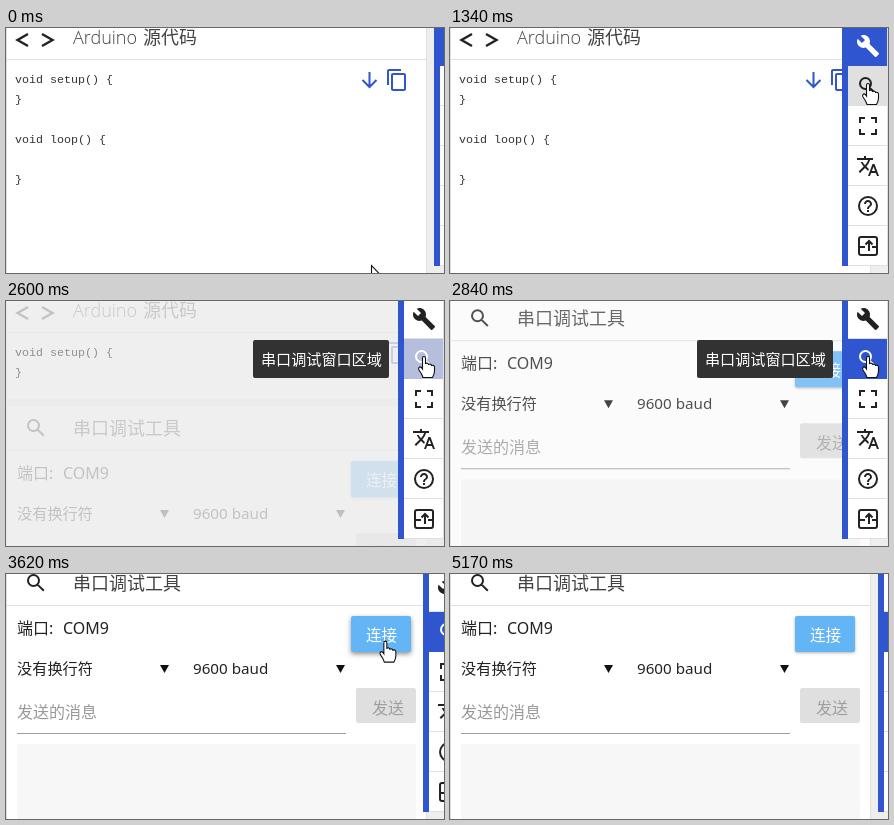
These frames come from a looping animation (438x245 px, 5.55 s). An HTML page with a canvas:

```html
<!DOCTYPE html>
<html lang="zh">
<head>
<meta charset="utf-8">
<title>Arduino 源代码</title>
<style>
html, body { margin: 0; width: 100%; height: 100%; overflow: hidden; background: #eee; }
canvas { display: block; width: 438px; height: 245px; }
</style>
</head>
<body>
<canvas id="stage" width="438" height="245"></canvas>
<script>
const ctx = document.getElementById('stage').getContext('2d');
const LOOP = 5550, START = 400, STEP = 78.2;
const BLUE = '#3056cf', INK = '#222', LINE = '#e0e0e0', PAGE = '#eee';
const SANS = '"Noto Sans", "Noto Sans CJK SC", "Noto Sans CJK", sans-serif';
const LIGHT = '"Open Sans", "Noto Sans CJK SC", "Noto Sans CJK", sans-serif';
const MONO = '"Liberation Mono", monospace';

// Icons on a 24 px grid
const WRENCH = new Path2D('M22.7 19l-9.1-9.1c.9-2.3.4-5-1.5-6.9-2-2-5-2.4-7.4-1.3L9 6 6 9 1.6 4.7C.4 7.1.9 10.1 2.9 12.1c1.9 1.9 4.6 2.4 6.9 1.5l9.1 9.1c.4.4 1 .4 1.4 0l2.3-2.3c.5-.4.5-1.1.1-1.4z');
const TRANSLATE = new Path2D('M12.87 15.07l-2.54-2.51.03-.03c1.74-1.94 2.98-4.17 3.71-6.53H17V4h-7V2H8v2H1v2h11.17C11.5 7.92 10.44 9.75 9 11.35 8.07 10.32 7.3 9.19 6.69 8h-2c.73 1.63 1.73 3.17 2.98 4.56l-5.09 5.02L4 19l5-5 3.11 3.11zM18.5 10h-2L12 22h2l1.12-3h4.75L21 22h2zm-2.62 7l1.62-4.33L19.12 17z');
const QUESTION = new Path2D('M12 6c-2.21 0-4 1.79-4 4h2c0-1.1.9-2 2-2s2 .9 2 2c0 2-3 1.75-3 5h2c0-2.25 3-2.5 3-5 0-2.21-1.79-4-4-4zM11 16h2v2h-2z');
const RING = new Path2D('M21 12a9 9 0 1 1-18 0a9 9 0 1 1 18 0z');
const COPY = new Path2D('M16 1H4c-1.1 0-2 .9-2 2v14h2V3h12zm3 4H8c-1.1 0-2 .9-2 2v14c0 1.1.9 2 2 2h11c1.1 0 2-.9 2-2V7c0-1.1-.9-2-2-2zm0 16H8V7h11z');
const SEARCH = new Path2D('M15 9.5a5.5 5.5 0 1 1-11 0a5.5 5.5 0 1 1 11 0zM13.6 13.6l6.2 6.2');
const CORNERS = new Path2D('M4 9V4h5M15 4h5v5M20 15v5h-5M9 20H4v-5');
const FOLD = new Path2D('M5 3h14q2 0 2 2v14q0 2-2 2H5q-2 0-2-2V5q0-2 2-2zM13 17V7M9.5 10.5L13 7l3.5 3.5M3 13h6M16 13h5');
const CODE = new Path2D('M22 6L11.5 12L22 18M36 6L46.5 12L36 18');
const DOWN = new Path2D('M8 1v15M1 9l7 7 7-7');
const ARROW = new Path2D('M.5.5v16l3.7-3.5 2.4 5.6 2.4-1-2.4-5.5h5z');
const HAND = new Path2D('M-1.5 12V2Q-1.5.5 0 .5T1.5 2V7.5Q4 6.500 4.500 8.500Q7 7.500 7.500 9.500Q10.500 8.500 10.500 11.500V15Q10.500 18 8.500 21.500H-1Q-2 18-5 14Q-6 12-4.500 11Q-3 10.500-1.500 13z');

// Key lists: [time, value, ...]
const POINTER = [[400, 365, 237], [556, 384, 192], [713, 424, 105], [791, 431, 83], [947, 430, 70],
  [1104, 424, 62], [1338, 418, 55], [3137, 418, 55], [3215, 412, 60], [3372, 393, 73],
  [3528, 384, 70], [3763, 370, 60], [3919, 366, 56], [4075, 400, 51], [4388, 394, 55],
  [4544, 394, 56], [4701, 398, 76], [4857, 405, 135], [5092, 418, 242]];
const SHIFT = [[713, 36], [791, 34], [869, 22], [947, 9], [1026, 3], [1104, 0],
  [3372, 0], [3450, 3], [3528, 13], [3606, 25], [3685, 33], [3763, 36]];
const TIP = [[1807, 0], [2198, 1], [3372, 1], [3606, 0]];
const VEIL = [[2434, 0], [2512, .5], [2590, .8], [2746, .4], [2903, .05], [3059, 0]];
const SCROLL = [[2590, 118], [2668, 72], [2746, 32], [2825, 8], [2903, 0]];
const PICK = [[2512, 0], [2590, .25], [2825, 1]];

function at(keys, t, i = 1) {
  if (t <= keys[0][0]) return keys[0][i];
  for (let n = 1; n < keys.length; n++) {
    const a = keys[n - 1], b = keys[n];
    if (t <= b[0]) return a[i] + (b[i] - a[i]) * (t - a[0]) / (b[0] - a[0]);
  }
  return keys[keys.length - 1][i];
}

function rect(x, y, w, h, color) {
  ctx.fillStyle = color;
  ctx.fillRect(x, y, w, h);
}

function box(x, y, w, h, color) {
  ctx.fillStyle = color;
  ctx.beginPath();
  ctx.roundRect(x, y, w, h, 2);
  ctx.fill();
}

function text(s, x, y, size, color = INK, family = SANS, weight = 400) {
  ctx.font = `${weight} ${size}px ${family}`;
  ctx.fillStyle = color;
  ctx.fillText(s, x, y);
}

function icon(path, x, y, color, line) {
  ctx.save();
  ctx.translate(x, y);
  ctx.fillStyle = ctx.strokeStyle = color;
  ctx.lineWidth = line || 1;
  if (line) ctx.stroke(path); else ctx.fill(path);
  ctx.restore();
}

function card(top, bottom, rule) {
  rect(0, top, 421, bottom - top, LINE);
  rect(1, top, 419, bottom - top, '#fff');
  rect(1, rule, 419, 1, LINE);
}

function codeLines(y, count, color) {
  ['void setup() {', '}', '', 'void loop() {', '', '}'].slice(0, count)
    .forEach((s, i) => text(s, 9, y + 55 + i * 19.9, 11.667, color, MONO));
}

function codeCard(y, bottom, count) {
  card(y - 13, bottom, y + 31);
  icon(CODE, 0, y, INK, 2.4);
  text('Arduino', 67, y + 16, 18, '#424242', LIGHT, 300);
  text('源代码', 137, y + 16, 18, '#424242', LIGHT, 300);
  codeLines(y, count, '#333');
  icon(DOWN, 355.500, y + 43, BLUE, 2);
  icon(COPY, 379, y + 40, BLUE);
}

function triangle(x, y) {
  ctx.fillStyle = '#111';
  ctx.beginPath();
  ctx.moveTo(x, y);
  ctx.lineTo(x + 9, y);
  ctx.lineTo(x + 4.5, y + 8);
  ctx.fill();
}

function serialCard(y, hover) {
  card(y - 13, 260, y + 31);
  icon(SEARCH, 18, y - 3, INK, 2);
  text('串口调试工具', 67, y + 16, 18, '#424242', LIGHT, 300);
  text('端口:', 11, y + 60, 16);
  text('COM9', 57, y + 60, 16);
  text('没有换行符', 11, y + 100, 15.2);
  text('9600 baud', 187, y + 100, 15.2);
  triangle(154, y + 91);
  triangle(330, y + 91);
  text('发送的消息', 11, y + 144, 16, '#999');
  rect(11, y + 159, 329, 1, '#9e9e9e');
  ctx.save();
  ctx.shadowColor = hover ? 'rgba(0,0,0,.45)' : 'rgba(0,0,0,.3)';
  ctx.shadowBlur = hover ? 5 : 3;
  ctx.shadowOffsetY = hover ? 2 : 1;
  box(345, y + 42, 60, 36, '#64b5f6');
  ctx.restore();
  text('连接', 360, y + 67, 15.6, '#fff');
  box(350, y + 114, 60, 35, '#dfdfdf');
  text('发送', 366, y + 140, 16, '#9f9f9f');
  rect(11, y + 170, 399, 90, '#f7f7f8');
}

function toolbar(x, t, over) {
  const picked = t >= 2510;
  rect(x, 0, 6, 238, BLUE);
  rect(x + 6, 0, 39, 238, '#fff');
  for (let y = 37; y < 240; y += 40) rect(x + 6, y, 39, 1, LINE);
  rect(x + 45, 0, 1, 238, LINE);
  if (!picked) rect(x + 6, 0, 39, 38, BLUE);
  if (over) rect(x + 6, 38, 39, 40, '#e0e0e0');
  if (picked) {
    ctx.globalAlpha = at(PICK, t);
    rect(x + 6, 38, 39, 40, BLUE);
    ctx.globalAlpha = 1;
  }
  const left = x + 14;
  icon(WRENCH, left, 6, picked ? INK : '#fff');
  icon(SEARCH, left, 46, picked ? '#fff' : INK, 2);
  icon(CORNERS, left, 86, INK, 2);
  icon(TRANSLATE, left, 126, INK);
  icon(RING, left, 166, INK, 2);
  icon(QUESTION, left, 166, INK);
  icon(FOLD, left, 206, INK, 2);
}

function pointer(x, y, hand) {
  const path = hand ? HAND : ARROW;
  icon(path, x, y, '#fff');
  icon(path, x, y, '#111', 1.1);
}

function draw(time) {
  const t = START + Math.floor((time - START) / STEP + .2) * STEP;
  const x = at(POINTER, t, 1), y = at(POINTER, t, 2);
  const bar = 392 + at(SHIFT, t);
  const onBar = x > bar + 3 && y < 238;
  const serial = t >= 2580;
  const onButton = serial && x >= 345 && x < 405 && y >= 42 && y < 78 && !onBar;
  const veil = at(VEIL, t), tip = at(TIP, t);

  rect(0, 0, 438, 245, PAGE);
  if (serial) {
    const top = at(SCROLL, t);
    if (top > 0) codeCard(top - 118, top - 20, 2);
    serialCard(top, onButton);
  } else {
    codeCard(0, 260, 6);
  }
  if (veil > 0) {
    ctx.globalAlpha = veil;
    rect(0, 0, 438, 245, '#ebebeb');
    if (serial) {
      ctx.globalAlpha = veil * .5;
      codeLines(at(SCROLL, t) - 118, 2, '#4a4a38');
    }
    ctx.globalAlpha = 1;
  }

  toolbar(bar, t, onBar && y >= 38 && y < 78);
  if (tip > 0) {
    ctx.globalAlpha = tip;
    box(247, 39, 136, 38, '#323232');
    text('串口调试窗口区域', 255, 64, 15.1, '#fff');
    ctx.globalAlpha = 1;
  }
  if (t < 5160) pointer(x, y, onBar || onButton);
}

const begin = performance.now();
function tick() {
  draw((performance.now() - begin) % LOOP);
  requestAnimationFrame(tick);
}
tick();
</script>
</body>
</html>
```
